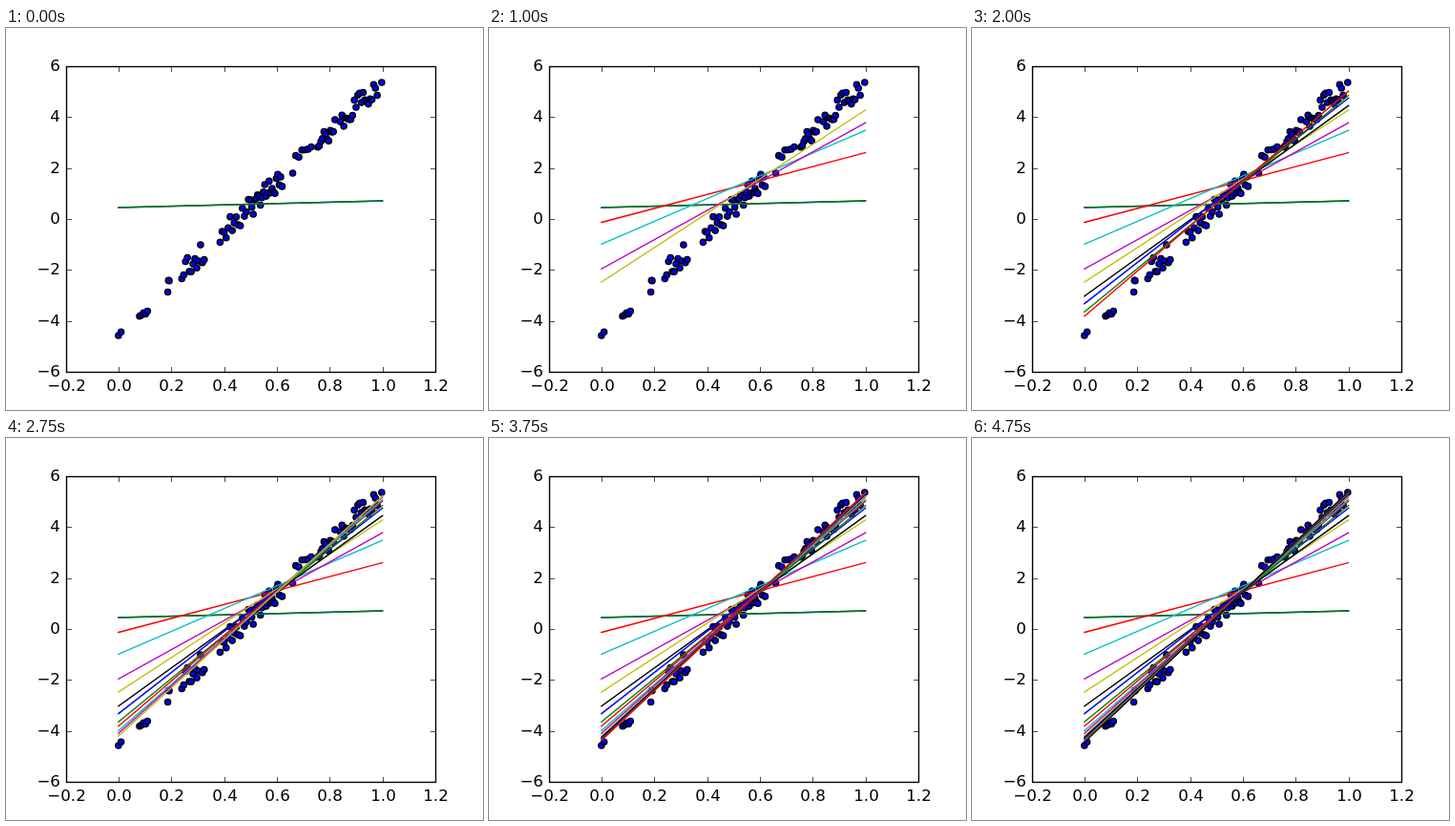
Recreate the animation shown at these times as an HTML page with a canvas. Size 500x400 px, loop 5 s.

```html
<!DOCTYPE html>
<html lang="en">
<head>
<meta charset="utf-8">
<title>Line fit converging</title>
<style>
  html, body { margin: 0; width: 100%; height: 100%; overflow: hidden; background: #fff; }
  canvas { display: block; }
</style>
</head>
<body>
<canvas id="plot" width="500" height="400"></canvas>
<script>
const ctx = document.getElementById('plot').getContext('2d');
const STEP = 250, LOOP = 5000;
const PT = 100 / 72; // one point in pixels
const LEFT = 62.5, RIGHT = 450, TOP = 40, BOTTOM = 360;
const COLORS = ['#0000ff', '#008000', '#ff0000', '#00bfbf', '#bf00bf', '#bfbf00', '#000000'];

const px = x => LEFT + (x + 0.2) / 1.4 * (RIGHT - LEFT);
const py = y => BOTTOM - (y + 6) / 12 * (BOTTOM - TOP);
const snap = v => Math.round(v) + 0.5;
const trend = x => -4.48 + 9.88 * x;

function seededRandom(seed) {
  return () => (seed = seed * 16807 % 2147483647) / 2147483647;
}

// Noisy samples of the trend, gathered in a few groups along x.
function makeDots() {
  const random = seededRandom(2024);
  const groups = [
    { from: 0, to: 0.01, count: 2, noise: 0.1 },
    { from: 0.08, to: 0.11, count: 5, noise: 0.4 },
    { from: 0.187, to: 0.192, count: 3, noise: 0.25 },
    { from: 0.24, to: 0.325, count: 13, noise: 0.4 },
    { from: 0.385, to: 0.5, count: 16, noise: 0.4 },
    { from: 0.505, to: 0.62, count: 22, noise: 0.38 },
    { from: 0.66, to: 0.73, count: 7, noise: 0.35 },
    { from: 0.755, to: 0.82, count: 12, noise: 0.35 },
    { from: 0.84, to: 0.98, count: 22, noise: 0.4 },
    { from: 0.997, to: 0.997, count: 1, noise: 0.02 }
  ];
  return groups.flatMap(({ from, to, count, noise }) =>
    Array.from({ length: count }, (_, i) => {
      const x = from + (to - from) * i / Math.max(1, count - 1);
      return [px(x), py(trend(x) + noise * (2 * random() - 1))];
    }));
}
const dots = makeDots();

// Exponential approach with an early kick and a small alternating overshoot.
function settle(start, end, rate, kick, wobble, k) {
  const bump = (kick + wobble * (-1) ** k) * (1 - Math.exp(-3 * k));
  return end + (start - end) * Math.exp(bump - rate * k);
}
const fitAtZero = k => settle(0.45, -4.47, 0.278, 0.185, 0.025, k);
const fitAtOne = k => settle(0.71, 5.42, 0.263, -0.315, -0.05, k);

function segment(x1, y1, x2, y2) {
  ctx.beginPath();
  ctx.moveTo(x1, y1);
  ctx.lineTo(x2, y2);
  ctx.stroke();
}

function drawDots() {
  ctx.fillStyle = '#0000ff';
  ctx.strokeStyle = '#000';
  ctx.lineWidth = PT;
  for (const [x, y] of dots) {
    ctx.beginPath();
    ctx.arc(x, y, Math.sqrt(20) / 2 * PT, 0, 2 * Math.PI);
    ctx.fill();
    ctx.stroke();
  }
}

// The starting guess is drawn twice, then each step adds one better fit.
function drawFits(step) {
  ctx.lineWidth = PT;
  ctx.lineCap = 'square';
  for (let i = 0; i <= step + 1; i++) {
    const k = Math.max(0, i - 1);
    ctx.strokeStyle = COLORS[i % COLORS.length];
    segment(px(0), py(fitAtZero(k)), px(1), py(fitAtOne(k)));
  }
  ctx.lineCap = 'butt';
}

function drawAxes() {
  const tick = 4 * PT;
  const label = v => String(v).replace('-', '\u2212');
  const left = snap(LEFT), right = snap(RIGHT), top = snap(TOP), bottom = snap(BOTTOM);
  ctx.strokeStyle = ctx.fillStyle = '#000';
  ctx.lineWidth = PT;
  ctx.strokeRect(left, top, right - left, bottom - top);

  ctx.lineWidth = PT / 2;
  ctx.font = `${12 * PT}px "DejaVu Sans", sans-serif`;
  ctx.textAlign = 'center';
  for (let i = 0; i <= 7; i++) {
    const value = (i - 1) / 5, x = snap(px(value));
    segment(x, bottom, x, bottom - tick);
    segment(x, top, x, top + tick);
    ctx.fillText(label(value.toFixed(1)), x, 380);
  }
  ctx.textAlign = 'right';
  for (let value = -6; value <= 6; value += 2) {
    const y = snap(py(value));
    segment(left, y, left + tick, y);
    segment(right, y, right - tick, y);
    ctx.fillText(label(value), LEFT - tick, Math.round(py(value)) + 5);
  }
}

function draw() {
  const step = Math.floor(performance.now() % LOOP / STEP);
  ctx.fillStyle = '#fff';
  ctx.fillRect(0, 0, 500, 400);
  drawDots();
  drawFits(step);
  drawAxes();
  requestAnimationFrame(draw);
}
draw();
</script>
</body>
</html>
```
